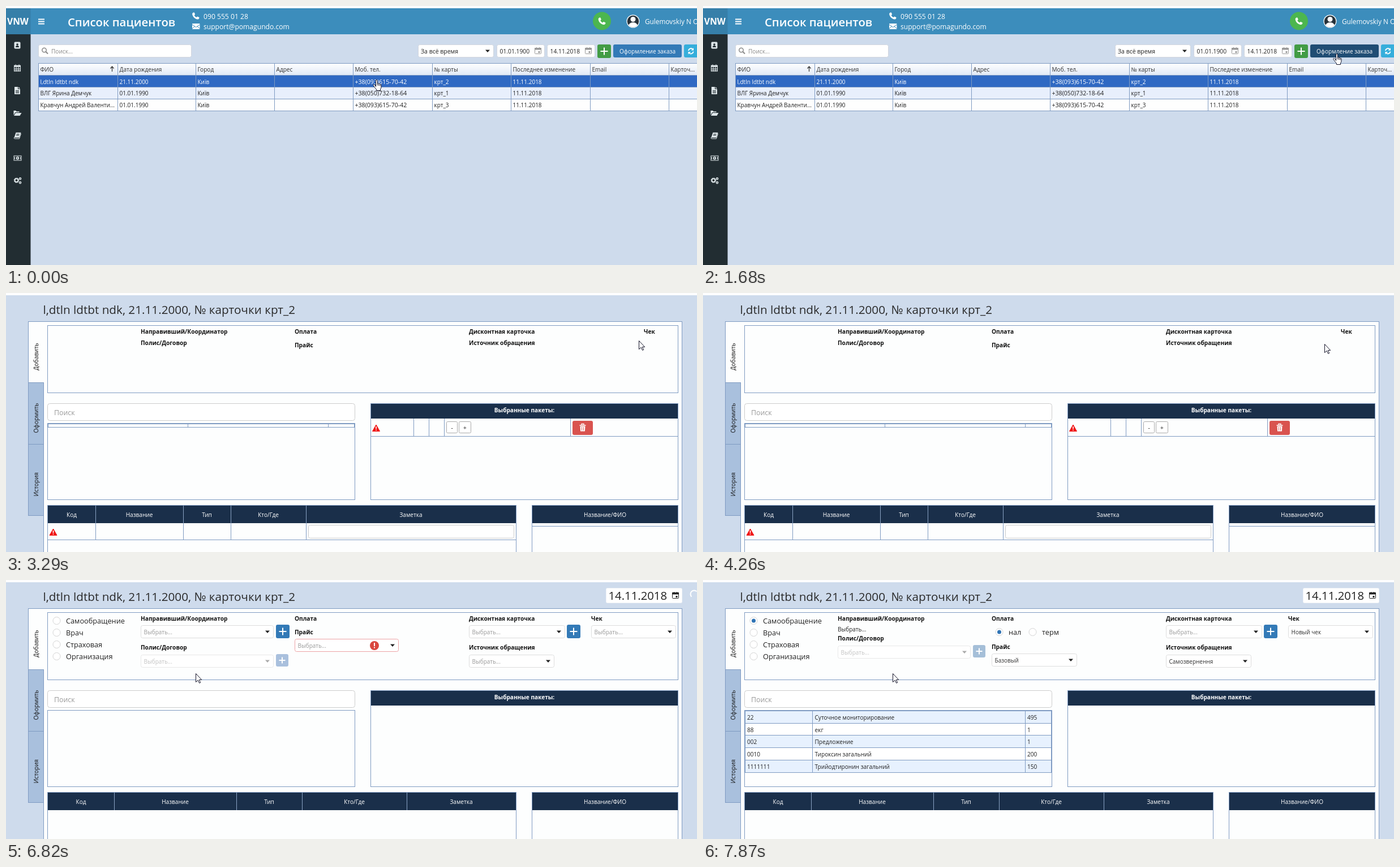
An HTML page for the animation above (8000 ms loop, 1221 by 458 pixels).

```html
<!DOCTYPE html>
<html lang="ru">
<head>
<meta charset="utf-8">
<title>Список пациентов</title>
<style>
html, body { margin: 0; width: 100%; height: 100%; overflow: hidden; background: #fff; }
svg { display: block; width: 100%; height: 100%; font-family: "Open Sans", "Noto Sans", sans-serif; }
text { white-space: pre; }
</style>
</head>
<body>
<svg id="stage" viewBox="0 0 1221 458" xmlns="http://www.w3.org/2000/svg"></svg>
<script>
const LOOP = 8000;
const BG = '#cedbec', LINE = '#7f9bc2', NAVY = '#1a2f4a', BLUE = '#337ab7', INK = '#222';
const PANEL = '#fdfefe', FIELD = '#d2d6de';

// Drawing helpers
const rect = (x, y, w, h, fill, extra = '') =>
  `<rect x="${x}" y="${y}" width="${w}" height="${h}" fill="${fill}" ${extra}/>`;
const box = (x, y, w, h, fill, stroke, r = 0) =>
  rect(x + .5, y + .5, w - 1, h - 1, fill, `stroke="${stroke}" rx="${r}"`);
const text = (x, y, s, size = 10.1, fill = INK, extra = '') =>
  `<text x="${x}" y="${y}" font-size="${size}" fill="${fill}" ${extra}>${s}</text>`;
const mid = (x, y, s, fill = '#fff', extra = '') =>
  text(x, y, s, 10.1, fill, 'text-anchor="middle" ' + extra);
const bold = (x, y, s) => text(x, y, s, 10.2, '#111', 'font-weight="700"');
const line = (d, stroke = LINE, w = 1) => `<path d="${d}" fill="none" stroke="${stroke}" stroke-width="${w}"/>`;
const shape = (d, fill, extra = '') => `<path d="${d}" fill="${fill}" ${extra}/>`;
const dot = (x, y, r, fill, extra = '') => `<circle cx="${x}" cy="${y}" r="${r}" fill="${fill}" ${extra}/>`;
const at = (x, y, s, scale = 1) => `<g transform="translate(${x} ${y}) scale(${scale})">${s}</g>`;
const group = (id, s) => `<g id="${id}">${s}</g>`;
const vlines = (xs, y1, y2, c) => xs.map(x => line(`M${x + .5} ${y1}V${y2}`, c)).join('');
const caret = (x, y, c = INK) => shape(`M${x - 4} ${y - 2}h8l-4 4.5z`, c);

const select = (x, y, w, s, color = '#999', border = '#ddd', arrow = INK) =>
  box(x, y, w, 23, '#fff', border, 3) + text(x + 5.5, y + 15.5, s, 10, color) + caret(x + w - 11, y + 11.5, arrow);
const plus = (x, y, w, fill) => rect(x, y, w, w, fill, 'rx="3"') +
  line(`M${x + w / 2} ${y + 5.5}v${w - 11}M${x + 5.5} ${y + w / 2}h${w - 11}`, '#fff', 2);
const radio = (x, y, s, on) => dot(x, y, 6.5, '#fff', 'stroke="#d5d5d5"') +
  (on ? dot(x, y, 3.5, '#2f74b5') : '') + text(x + 16.5, y + 4.8, s, 12.7, INK);
const calendar = (x, y, c) => at(x, y, box(0, 1, 12, 11, 'none', c, 1) + rect(0, 1, 12, 3.5, c) +
  line('M3.5 0v2M8.5 0v2', c, 1.4) + rect(6.5, 7, 3, 3, c));
const handset = 'M3.1.2C1.4.6.1 1.8.2 3.6.6 8.6 5.3 13.2 10.3 13.6c1.8.1 2.9-1.1 3.3-2.8.1-.5-.1-.8-.5-1L10.4 8.4c-.4-.2-.8-.1-1.1.2L8.2 9.9C6.3 9.1 4.8 7.6 4 5.7L5.2 4.6c.3-.3.4-.6.2-1L4.1.7C3.9.3 3.6.1 3.1.2z';
const warning = (x, y) => shape(`M${x} ${y - 6}l6.5 11.5h-13z`, '#f01414', 'stroke="#f01414" stroke-linejoin="round"') +
  line(`M${x} ${y - 3}v4.5m0 1.2v1.6`, '#fff', 1.6);

// Patient list
function sidebar() {
  const c = '#dfe7ea', d = '#222d32';
  const ring = (x, y, r, w) => dot(x, y, r, 'none', `stroke="${c}" stroke-width="${w}"`);
  const icons = [
    box(1, 0, 11, 12, c, c, 1) + dot(6.5, 4.5, 1.8, d) + shape('M3.5 9.5q0-3 3-3t3 3z', d),
    box(.5, 1.5, 12, 11, 'none', c) + rect(.5, 1.5, 12, 3, c) + line('M1 7.5h11M1 10h11M4.5 4v8M8.5 4v8M3.5 0v3M9.5 0v3', c),
    shape('M1.5 0h6v4h4v9h-10z', c) + shape('M8.5 0l3 3h-3z', c) + line('M3.5 6.5h6M3.5 8.5h6M3.5 10.5h6', d),
    shape('M0 10V2h4l1 1.5h5V5H3z', c) + shape('M3.5 6h10.5l-3 5H.5z', c),
    shape('M4 1h9l-3 9H1z', c) + line('M5 4h5M4.5 6h5', d) + line('M1 9.5q-1 2.5 1 2.5h8l3-9', c),
    box(0, 2, 14, 9, 'none', c) + dot(7, 6.5, 2.7, c) + line('M7 5v3', d) + line('M2 4.5v4M12 4.5v4', c),
    ring(5, 6, 3, 2) + dot(5, 6, 4.3, 'none', `stroke="${c}" stroke-dasharray="1.7 1.67"`) +
      ring(11.5, 3, 1.6, 1.5) + ring(11.5, 10, 1.6, 1.5)
  ];
  return rect(0, 50, 43.5, 408, d) + icons.map((s, i) => at(13.5, 63.5 + i * 39.8, s)).join('');
}

function header() {
  return rect(0, 4, 1221, 46, '#3c8dbc') + rect(0, 4, 43.5, 46, '#367fa9') +
    text(21, 33, 'VNW', 15.6, '#fff', 'font-weight="700" text-anchor="middle"') +
    line('M57 23.5h11M57 27.5h11M57 31.5h11', '#fff', 1.8) +
    text(109, 36, 'Список пациентов', 20.3, '#fff', 'font-weight="600"') +
    at(329, 11, shape(handset, '#fff'), .92) + text(349, 22.5, '090 555 01 28', 12.15, '#fff') +
    rect(329, 31, 13.5, 10, '#fff', 'rx="1"') + line('M329 33l6.7 4.5 6.8-4.5M329 40l4.5-4M342.5 40l-4.5-4', '#3c8dbc') +
    text(349, 41, 'support@pomagundo.com', 12.1, '#fff') +
    dot(1053, 26.5, 16, '#4cb64f') + at(1046.5, 20, shape(handset, '#fff'), .95) +
    dot(1108, 27, 11.5, '#fff') + dot(1108, 27, 10.3, '#26323a') + dot(1108, 23.5, 4.5, '#fff') +
    shape('M1100.3 33.8q1.7-4.8 7.7-4.8t7.7 4.8q-3 3.5-7.7 3.5t-7.7-3.5z', '#fff') +
    text(1129, 31.5, 'Gulemovskiy N O', 11.8, '#fff');
}

function toolbar() {
  const date = (x, s) => box(x, 68, 85, 23, '#fff', FIELD, 3) + text(x + 5.5, 83.5, s, 10.3) + calendar(x + 67, 73, '#999');
  return box(57, 68, 271, 23, '#fff', FIELD, 3) +
    dot(67.5, 78, 3.7, 'none', 'stroke="#888" stroke-width="1.5"') + line('M70 80.5l4 4', '#888', 2) +
    text(80, 83.5, 'Поиск...', 10.1, '#8a8a8a') +
    box(728, 68, 134, 23, '#fff', FIELD, 3) + text(733, 83.5, 'За всё время', 10.5) + caret(851, 79.5) +
    date(867, '01.01.1900') + date(956, '14.11.2018') + plus(1045, 68, 24, '#429c45') +
    `<rect id="order" x="1073" y="68" width="121" height="23" rx="3"/>` +
    mid(1133.5, 83.5, 'Оформление заказа') +
    rect(1198, 68, 30, 23, '#35aedb', 'rx="3"') +
    line('M1206 79a4.3 4.3 0 0 1 7.5-2.5M1214.5 80.5a4.3 4.3 0 0 1-7.5 2.5', '#fff', 1.8) +
    shape('M1215 74v4.5h-4.5zM1205.5 85.5V81h4.5z', '#fff');
}

function patients() {
  const xs = [57, 197, 335, 474, 613, 753, 892, 1032, 1171];
  const heads = ['ФИО', 'Дата рождения', 'Город', 'Адрес', 'Моб. тел.', '№ карты', 'Последнее изменение', 'Email', 'Карточ...'];
  const rows = [
    ['l,dtln ldtbt ndk', '21.11.2000', 'Київ', '', '+38(093)615-70-42', 'крт_2', '11.11.2018'],
    ['ВЛГ Ярина Демчук', '01.01.1990', 'Київ', '', '+38(050)732-18-64', 'крт_1', '11.11.2018'],
    ['Кравчун Андрей Валенти...', '01.01.1990', 'Київ', '', '+38(093)615-70-42', 'крт_3', '11.11.2018']
  ];
  const fills = ['#2f69c3', '#e8effc', '#fefefe'];
  let s = rect(57, 101, 1164, 22, 'url(#head)');
  rows.forEach((r, i) => s += rect(57, 123 + i * 21, 1164, 21, fills[i]));
  s += [101, 122, 143, 164, 185].map(y => line(`M57 ${y + .5}H1221`)).join('') + vlines(xs, 101, 186);
  heads.forEach((h, i) => s += text(xs[i] + 3.5, 116, h, 10.1, '#333'));
  rows.forEach((r, i) => r.forEach((v, j) =>
    s += text(xs[j] + 3.5, 137.5 + i * 20.8, v, j === 4 ? 10.6 : 10, i ? INK : '#fff')));
  return s + line('M187.5 116v-9m-3 3.5l3-3.5 3 3.5', '#333', 1.2);
}

// Order form
function frame() {
  const tab = (y, h, s, fill) => box(39, y, 28, h, fill, LINE) +
    `<text transform="translate(57 ${y + h / 2 + 8}) rotate(-90)" font-size="10.3" fill="#111" text-anchor="middle">${s}</text>`;
  return rect(0, 4, 1221, 454, BG) +
    text(65.5, 37, 'l,dtln ldtbt ndk, 21.11.2000, № карточки крт_2', 20.7, '#2a2a2a') +
    box(66, 50, 1129, 420, PANEL, LINE) +
    tab(50, 109, 'Добавить', PANEL) + tab(158, 110, 'Оформить', '#a9c0dd') + tab(267, 127, 'История', '#a9c0dd') +
    rect(66, 51, 1.2, 107, PANEL) +
    box(73, 57, 1115, 120, PANEL, LINE) +
    box(73, 195, 544, 31, '#fff', '#ccc', 4) + text(85, 215.5, 'Поиск', 12.4, '#999') +
    box(73, 230, 544, 136, PANEL, LINE) +
    box(644, 195, 544, 171, PANEL, LINE) + rect(645, 196, 542, 26, NAVY) +
    mid(916, 211, 'Выбранные пакеты:', '#fff', 'font-weight="700"') +
    box(73, 375, 829, 90, PANEL, LINE) + rect(74, 376, 827, 31, NAVY) +
    box(929, 375, 259, 90, PANEL, LINE) + rect(930, 376, 257, 31, NAVY) +
    mid(1058.5, 395.5, 'Название/ФИО') +
    bold(238, 72, 'Направивший/Координатор') + bold(510, 72, 'Оплата') + bold(818, 72, 'Дисконтная карточка');
}

function columns(xs) {
  const names = ['Код', 'Название', 'Тип', 'Кто/Где', 'Заметка'];
  const edges = [74, ...xs, 901];
  return vlines(xs, 376, 407, '#8aa3c4') +
    names.map((s, i) => mid((edges[i] + edges[i + 1]) / 2, 395.5, s)).join('');
}

function rawForm() {
  const step = (x, w, s) => box(x, 227, w, 21, '#fff', '#aaa', 2) + mid(x + w / 2, 241.5, s, INK);
  const cols = [158, 313, 397, 530];
  return bold(238, 91.5, 'Полис/Договор') + bold(510, 96, 'Прайс') +
    bold(818, 91.5, 'Источник обращения') + bold(1127, 72, 'Чек') +
    box(74, 231, 542, 7, PANEL, LINE) + vlines([321, 569], 231, 238) +
    line('M645 253.5H1187') + vlines([720, 747, 774, 997], 222, 254) + warning(654, 239) +
    step(778, 20, '-') + step(800, 22, '+') +
    rect(1001, 226, 36, 25, '#d9534f', 'rx="3"') +
    line('M1013.5 234h11M1017 233v-1.5h4v1.5', '#fff', 1.3) +
    shape('M1014.5 235.5h9l-.6 9h-7.8z', '#fff') + line('M1017.5 237v6M1020.5 237v6', '#d9534f', .9) +
    columns(cols) + line('M74 436.5H901') + vlines(cols, 407, 437) +
    warning(83.5, 423) + box(534, 410, 364, 24, '#fff', '#ccc', 3) +
    line('M930 412.5H1187');
}

function liveForm() {
  return box(1060, 14, 135, 27, '#fff', '#eef2f7', 2) + text(1064.5, 35, '14.11.2018', 20.3) + calendar(1177, 21, '#222') +
    ['Врач', 'Страховая', 'Организация'].map((s, i) => radio(89.5, 93 + i * 21, s)).join('') +
    select(818, 80, 170, 'Выбрать...') + plus(991, 79, 24, BLUE) + bold(1034, 72, 'Чек') +
    bold(818, 123, 'Источник обращения') + columns([191, 407, 523, 708]);
}

function emptyFields() {
  return radio(89.5, 72, 'Самообращение') +
    select(238, 80, 235, 'Выбрать...') + plus(477, 79, 24, BLUE) + bold(238, 123, 'Полис/Договор') +
    select(238, 132, 235, 'Выбрать...', '#c3c3c3', '#e8e8e8', '#aaa') + plus(477, 131, 22, '#a9c0dd') +
    bold(510, 96, 'Прайс') + select(510, 104, 184, 'Выбрать...', '#999', '#eda3a6') +
    dot(651, 116, 8, '#d9483f') + line('M651 111v6m0 1.5v2', '#fff', 2) +
    select(1034, 80, 150, 'Выбрать...') + select(818, 132, 151, 'Выбрать...');
}

function filledFields() {
  const items = [['22', 'Суточное мониторирование', '495'], ['88', 'екг', '1'], ['002', 'Предложение', '1'],
    ['0010', 'Тироксин загальний', '200'], ['1111111', 'Трийодтиронин загальний', '150']];
  const top = i => 231 + Math.round(i * 21.7);
  return radio(89.5, 72, 'Самообращение', true) + text(238, 91, 'Выбрать...', 10) +
    bold(238, 107, 'Полис/Договор') +
    select(238, 116, 235, 'Выбрать...', '#c3c3c3', '#e8e8e8', '#aaa') + plus(477, 115, 22, '#a5bfd8') +
    radio(523.5, 92, 'нал', true) + radio(582.5, 92, 'терм') +
    bold(510, 122, 'Прайс') + select(510, 130, 151, 'Базовый', '#333') +
    select(1034, 80, 150, 'Новый чек', '#333') + select(818, 132, 151, 'Самозвернення', '#333') +
    items.map((r, i) => box(74, top(i), 542, top(i + 1) - top(i) + 1, i % 2 ? '#fff' : '#e7f1fe', LINE) +
      [78, 197.5, 573].map((x, j) => text(x, top(i) + 15.5, r[j])).join('')).join('') +
    vlines([193, 569], 231, 340);
}

const arrow = shape('M.5.5V15.5L4.2 12.2 6.6 17.3 8.7 16.4 6.3 11.4H10.7z', '#fff', 'stroke="#15152a"');
const hand = shape('M5.5 12.5V2q0-1.5 1.4-1.5T8.3 2v5q2-1 2.4.6 1.8-.7 2.3.8 2-.3 2 1.4V13q0 2.5-1.5 4v2.5h-7V17.5Q4.5 15.5 3.2 13.4L1 10.3Q.3 9 1.5 8.6t2.3 1.2z', '#fff', 'stroke="#15152a"') +
  line('M8.3 7v3.5M10.7 8v3M13 9v2.5', '#15152a');

const stage = document.getElementById('stage');
stage.innerHTML =
  `<defs><linearGradient id="head" x2="0" y2="1"><stop offset="0" stop-color="#fff"/><stop offset="1" stop-color="#dfe8f6"/></linearGradient></defs>` +
  rect(0, 0, 1221, 458, '#fefefe') + rect(0, 4, 1221, 1, '#c0c0c0') +
  group('list', rect(0, 4, 1221, 454, BG) + header() + sidebar() + toolbar() + patients()) +
  group('form', frame() + group('raw', rawForm()) +
    group('live', liveForm() + group('empty', emptyFields()) + group('filled', filledFields()))) +
  group('load', '<rect id="bar" y="4" height="2" fill="#fff"/>' +
    '<path id="spin" d="M1211.4 29.6A6.5 6.5 0 0 1 1220.6 20.4" fill="none" stroke="#fff" stroke-width="2"/>') +
  group('arrow', arrow) + group('hand', hand);

const el = {};
stage.querySelectorAll('[id]').forEach(n => el[n.id] = n);
const show = (id, on) => el[id].setAttribute('display', on ? 'inline' : 'none');

// [time, x, y, hand]
const moves = [
  [0, 648, 130, 1], [290, 1125, 110, 1], [440, 1125, 97, 0], [590, 1120, 92, 0], [740, 1113, 84, 1],
  [1830, 1118, 84, 0], [4260, 1098, 90, 0], [4380, 1037, 105, 0], [4530, 786, 146, 0],
  [4680, 466, 161, 0], [4830, 354, 164, 0], [4960, 335, 165, 0]
];
// [time, progress width]
const loading = [[6820, 0], [6940, 140], [7070, 280], [7190, 420], [7330, 550], [7490, 780], [7610, 1000], [7730, 1221]];
const current = (steps, t) => steps.reduce((a, s) => s[0] <= t ? s : a);

function render(t) {
  const ready = t >= 6820, filled = t >= 7330;
  show('list', t < 1830);
  show('form', t >= 3290);
  show('raw', !ready);
  show('live', ready);
  show('empty', !filled);
  show('filled', filled);
  show('load', ready && t < 7870);
  el.order.setAttribute('fill', t < 740 ? BLUE : t < 1680 ? '#286090' : '#204d74');

  const [, x, y, isHand] = current(moves, t);
  show('hand', isHand);
  show('arrow', !isHand);
  el[isHand ? 'hand' : 'arrow'].setAttribute('transform', `translate(${x} ${y})`);

  const [start, width] = current(loading, t);
  el.bar.setAttribute('width', width);
  el.spin.setAttribute('transform', `rotate(${(start - 6820) * .9} 1216 25)`);
}

const begin = performance.now();
function tick() {
  render((performance.now() - begin) % LOOP);
  requestAnimationFrame(tick);
}
render(0);
requestAnimationFrame(tick);
</script>
</body>
</html>
```
